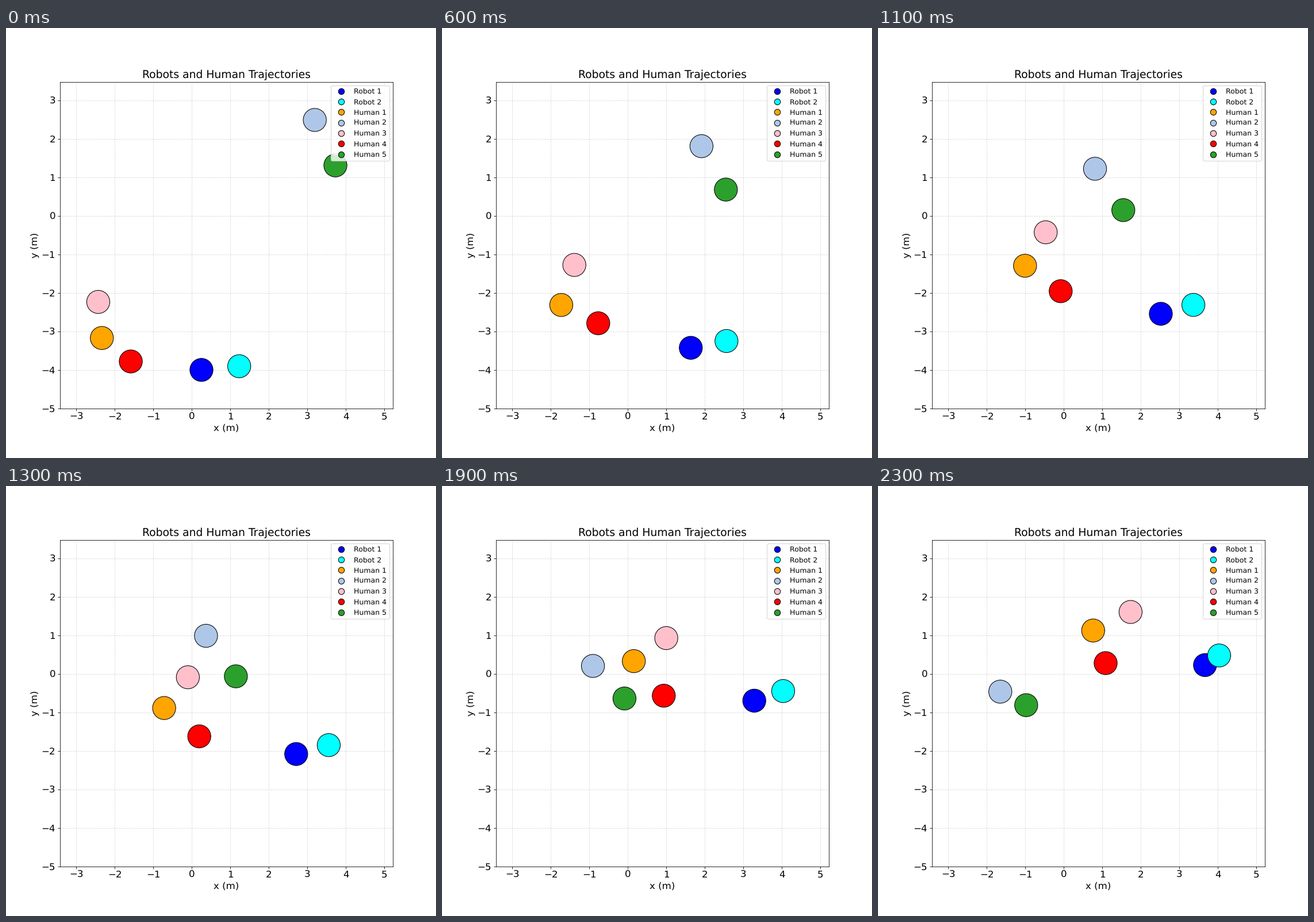
A matplotlib script for the animation above (2400 ms loop, 748 by 748 pixels).

```python
import numpy as np
import matplotlib.pyplot as plt
from matplotlib.animation import FuncAnimation
from matplotlib.lines import Line2D
from matplotlib.patches import Circle

FRAMES, INTERVAL = 24, 100
STEP = 0.25
RADIUS = 0.3
TURN_START = 15


def walk(start, angles, lengths):
    """Positions reached by moving along each heading (radians) in turn."""
    moves = np.column_stack([np.cos(angles), np.sin(angles)])
    moves *= np.reshape(lengths, (-1, 1))
    return np.array(start) + np.vstack([[0, 0], np.cumsum(moves, axis=0)])


def robot(x, *runs):
    """Even steps; runs are (heading in 22.5 degree units, step count)."""
    units = np.repeat([h for h, _ in runs], [n for _, n in runs])
    return walk((x, -4), units * np.pi / 8, np.full(len(units), STEP))[1:]


def human(x, y, heading, speed=STEP, lag=0.05, turn=0, until=22):
    """Speed up from rest, go straight, then ease into a turn (degrees)."""
    t = np.arange(FRAMES)
    lengths = np.diff(speed * (t - lag * np.tanh(t / lag)))
    u = np.clip((t[:-1] + 0.5 - TURN_START) / (until - TURN_START), 0, 1)
    angles = np.radians(heading + turn * u * u * (3 - 2 * u))
    return walk((x, y), angles, lengths)


# name: (colour, path)
AGENTS = {
    "Robot 1": ("blue", robot(0, (0, 1), (1, 6), (2, 5), (3, 12))),
    "Robot 2": ("cyan", robot(1, (1, 6), (2, 5), (3, 8), (4, 1), (3, 2), (5, 2))),
    "Human 1": ("orange", human(-2.337, -3.171, 54.7, lag=1.8, turn=-2.3)),
    "Human 2": ("#aec7e8", human(3.194, 2.493, 208, lag=0.2, turn=14, until=20)),
    "Human 3": ("pink", human(-2.431, -2.234, 42.7, lag=0.33)),
    "Human 4": ("red", human(-1.586, -3.78, 50.5, speed=0.216, turn=36, until=23)),
    "Human 5": ("#2ca02c", human(3.73, 1.313, 208, speed=0.227, lag=0.1, turn=-19)),
}

plt.rcParams["text.hinting"] = "none"
fig, ax = plt.subplots(figsize=(10, 10), dpi=74.8)
ax.set_aspect("equal")
ax.set_xlim(-3.431, 5.226)
ax.set_ylim(-5, 3.482)
ax.set_title("Robots and Human Trajectories", fontsize=18)
ax.set_xlabel("x (m)", fontsize=16)
ax.set_ylabel("y (m)", fontsize=16)
ax.set_xticks(range(-3, 6))
ax.set_yticks(range(-5, 4))
ax.tick_params(labelsize=16)
ax.grid(True, linestyle="--", alpha=0.5)

discs, handles = [], []
for name, (color, path) in AGENTS.items():
    discs.append(ax.add_patch(Circle(path[0], RADIUS, facecolor=color,
                                     edgecolor="black", zorder=3)))
    handles.append(Line2D([0], [0], marker="o", color="w", label=name,
                          markersize=10, markerfacecolor=color,
                          markeredgecolor="black"))
ax.legend(handles=handles, loc="upper right", fontsize=12, labelspacing=0.537)


def update(frame):
    for disc, (_, path) in zip(discs, AGENTS.values()):
        disc.center = path[frame]
    return discs


anim = FuncAnimation(fig, update, frames=FRAMES, interval=INTERVAL, repeat=True)
plt.show()
```
